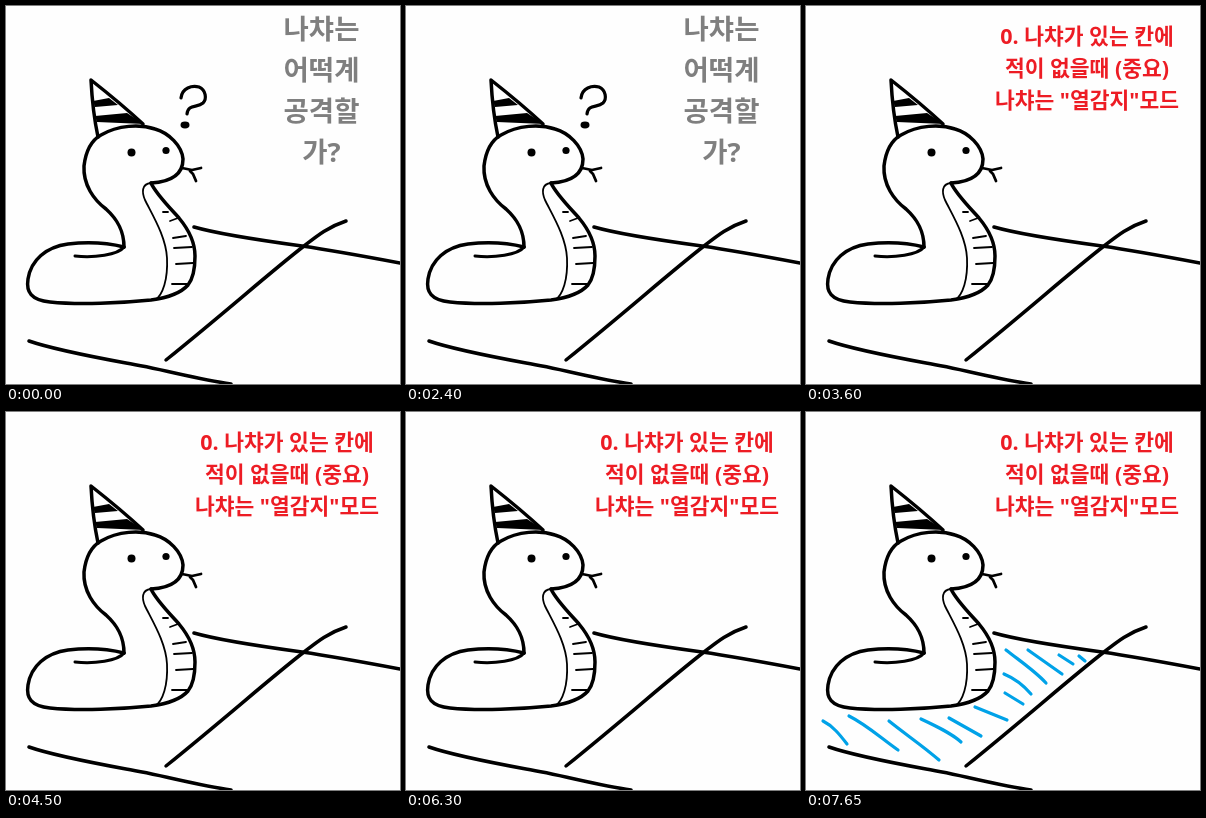
Animation of 394x378 px, one loop 8000 ms. Source, as an HTML page with a canvas:

```html
<!DOCTYPE html>
<html lang="ko">
<head>
<meta charset="utf-8">
<style>
html, body { margin: 0; width: 100%; height: 100%; overflow: hidden; background: #fefefe; }
canvas { display: block; }
</style>
</head>
<body>
<canvas id="stage" width="394" height="378"></canvas>
<script>
const ctx = document.getElementById('stage').getContext('2d');
const LOOP = 8000, ANSWER = 3600;
const FONT = '"Open Sans", "Noto Sans CJK KR", "Noto Sans CJK", sans-serif';
ctx.lineCap = ctx.lineJoin = 'round';

function stroke(d, width = 3.5, color = '#000') {
  ctx.strokeStyle = color;
  ctx.lineWidth = width;
  ctx.stroke(new Path2D(d));
}

function fill(d) {
  ctx.fillStyle = '#000';
  ctx.fill(new Path2D(d));
}

function dot(x, y, rx, ry = rx, color = '#000') {
  ctx.fillStyle = color;
  ctx.beginPath();
  ctx.ellipse(x, y, rx, ry, 0, 0, Math.PI * 2);
  ctx.fill();
}

function text(lines, x, y, step, size, color) {
  ctx.font = `bold ${size}px ${FONT}`;
  ctx.textAlign = 'center';
  ctx.fillStyle = color;
  lines.forEach((line, i) => ctx.fillText(line, x, y + i * step));
}

function floor() {
  stroke('M188 221C212 228 252 234 296 240C330 245 362 251 394 257');
  stroke('M340 215C322 221 312 229 298 240C262 268 222 304 160 354');
  stroke('M23 335C46 343 82 350 120 357C156 363 190 373 225 378');
}

function hat() {
  stroke('M92 131C88 112 86 94 85 74C104 89 121 103 137 118');
  fill('M87 95L103 92L112 99L89 101Z');
  fill('M89 110L121 107L138 118L91 116Z');
}

function snake() {
  // head and neck
  stroke('M118 241C118 224 111 213 100 203C88 194 77 179 78 160C80 143 86 134 95 129' +
    'C112 119 134 118 149 123C163 127 176 140 177 153C177 170 162 176 145 177');
  // chest and coil
  stroke('M145 177C150 188 165 203 173 212C183 224 189 237 189 250C189 266 186 274 182 279' +
    'C174 288 160 292 145 294' +
    'C116 297 73 299 44 296C25 294 20 286 22 273C25 254 40 241 62 238C80 236 98 236 118 241');
  stroke('M69 250C88 252 112 249 118 241', 3);
  // belly
  stroke('M145 177C135 178 136 187 139 194C147 210 160 231 161 252C162 273 157 289 149 294', 1.8);
  stroke('M157 206L162 206M164 215L172 212M167 232L180 230M168 242L186 241M170 258L187 257M166 278L181 278', 1.8);
  dot(125.5, 146.5, 4);
  dot(160, 144.5, 3.6);
  stroke('M176 162L186 164L195 162M184 165L187 168L190 175', 2.8);
}

function question() {
  stroke('M175 92C176 82 186 79 193 81C200 84 201 93 197 97C191 102 182 98 181 108', 3.2);
  dot(179, 119, 4.5, 3.4);
}

function heat() {
  stroke('M17 309C27 314 34 323 41 332M43 304C61 313 76 327 92 338M83 309C99 322 117 334 133 348' +
    'M115 307C130 314 145 321 155 330M143 306L175 324M169 295L201 308M199 281L217 292' +
    'M198 262C210 267 219 275 225 282M200 238C214 249 229 259 240 271M222 238L256 262' +
    'M253 243L267 252M273 244L279 249', 3.2, '#00a2e8');
}

function draw(t) {
  ctx.fillStyle = '#fefefe';
  ctx.fillRect(0, 0, 394, 378);
  const asking = t < ANSWER;
  const lit = Math.floor(asking ? t / 600 : (t - ANSWER) / 450) % 2 === 1;
  if (!asking && lit) heat();
  floor();
  hat();
  snake();
  if (asking) {
    question();
    text(['나챠는', '어떡계', '공격할', '가?'], 315.5, 32.5, 41, 27.5, '#7f7f7f');
    if (lit) for (const x of [280, 319, 358]) dot(x, 176, 6, 6, '#7f7f7f');
  } else {
    text(['0. 나챠가 있는 칸에', '적이 없을때 (중요)', '나챠는 "열감지"모드'], 281, 38, 32, 21.5, '#ed1c24');
  }
}

function frame(now) {
  draw(now % LOOP);
  requestAnimationFrame(frame);
}
draw(0);
requestAnimationFrame(frame);
</script>
</body>
</html>
```
